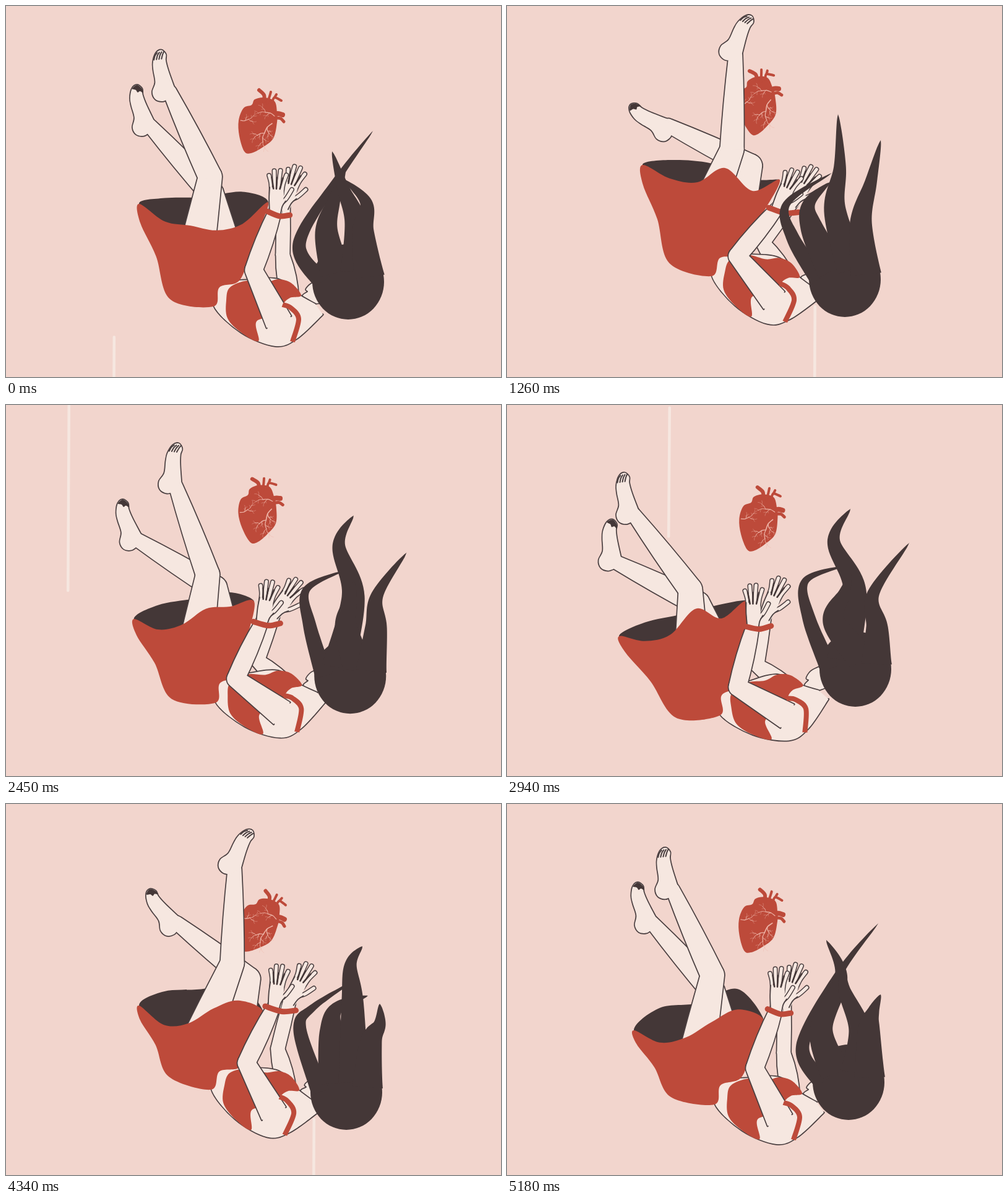
These frames come from a looping animation (800x600 px, 5250 ms). An HTML page with a canvas:

```html
<!DOCTYPE html>
<html lang="en">
<head>
<meta charset="utf-8">
<title>Falling</title>
<style>
  html, body { margin: 0; width: 100%; height: 100%; overflow: hidden; background: #f2d5cd; }
  canvas { display: block; width: 100vw; height: 100vh; }
</style>
</head>
<body>
<canvas id="stage" width="800" height="600"></canvas>
<script>
const ctx = document.getElementById('stage').getContext('2d');
const LOOP = 5250, STEP = 70;
const BG = '#f2d5cd', SKIN = '#f6e7e0', RED = '#bd4a3a', DARK = '#443737', INK = '#4a3f40', PALE = '#f5dfd7', VEIN = '#eeb5a8';

// Streaks: x, length, time of entry at the bottom edge
const streaks = [
  [174, 330, -43], [335, 250, 560], [497, 330, 1184], [262, 208, 1493], [651, 336, 1517], [335, 250, 1793],
  [101, 300, 2050], [262, 208, 2543], [497, 330, 3358], [497, 330, 4280], [101, 300, 4360], [651, 336, 4420]
];

// root (the waist) and heart: x, y, degrees; limbs: angles from the body outwards, 0 = up;
// rim: both ends of the skirt opening, with the sag of its front and back edges;
// locks: two bends and a tip for each of four locks of hair
const poses = [
  { at: 0, root: [335,486,0], heart: [392,238,0],
    leg: [10.3,-25.4,6], farLeg: [-12.6,-42.4,0], arm: [-26,20,3], farArm: [-10,1,20],
    rim: [215,320,424,318], front: [29,36,44,34], back: [-9,-10,-18], head: [553,446],
    locks: [474,385,532,285,593,202, 518,365,530,315,549,262, 565,350,545,295,527,235, 577,365,582,318,545,280] },
  { at: 1260, root: [330,437,7.7], heart: [402,208,-15],
    leg: [22.2,2.2,40], farLeg: [14,-63.8,-43], arm: [-39.9,39.7,25], farArm: [-35,36,32],
    rim: [219,257,441,282], front: [17,18,-10,22], back: [-13,-15,3], head: [546,442],
    locks: [462,375,452,320,525,270, 493,360,488,320,522,285, 530,330,538,260,535,175, 572,350,588,285,604,217] },
  { at: 1890, root: [331,457,5.7], heart: [410,207,-21],
    leg: [22.1,1.1,42], farLeg: [6,-52.4,-21], arm: [-45.4,37.4,24], farArm: [-43,32,52],
    rim: [238,312,417,318], front: [27,21,14,-14], back: [-24,-32,-37], head: [548,452],
    locks: [494,370,490,315,548,277, 560,320,550,235,570,192, 575,365,573,325,570,300, 598,360,610,310,644,258] },
  { at: 2940, root: [344,502,-12.7], heart: [395,236,-4],
    leg: [-1.1,-37,5], farLeg: [-21.7,-63.3,13], arm: [-59.9,14.2,0], farArm: [-54.4,9,24],
    rim: [181,374,388,318], front: [19,20,-11,16], back: [-11,-8,-7], head: [563,427],
    locks: [488,345,482,285,545,260, 562,300,528,220,555,168, 528,350,545,305,556,272, 598,360,592,305,650,223] },
  { at: 3710, root: [341,483,-9.5], heart: [387,247,6],
    leg: [4.9,-18.3,14], farLeg: [-5.1,-69.3,-28], arm: [-49.4,9.4,0], farArm: [-39.5,4.3,26],
    rim: [194,335,388,341], front: [32,37,24,11], back: [-21,-17,-28], head: [561,426],
    locks: [482,375,490,325,535,240, 527,340,535,290,578,267, 562,290,540,225,556,190, 592,320,584,255,608,197] },
  { at: 4340, root: [331,462,7.5], heart: [385,238,10],
    leg: [22.7,1.5,42], farLeg: [13,-52,-21], arm: [-28.5,25.8,8], farArm: [-13.7,13.9,28],
    rim: [215,326,416,337], front: [29,24,-2,-17], back: [-25,-32,-45], head: [550,466],
    locks: [475,365,495,330,560,287, 525,370,535,330,585,310, 560,320,557,260,576,230, 590,385,604,355,604,323] },
  { at: 5180, root: [335,486,0], heart: [390,240,1],
    leg: [11.1,-24.9,8], farLeg: [-12.4,-41.6,-2], arm: [-26,20,3], farArm: [-10,1,20],
    rim: [205,366,415,350], front: [23,18,-4,-21], back: [-33,-36,-54], head: [552,450],
    locks: [478,390,538,272,600,193, 508,365,540,280,516,220, 570,365,545,300,545,262, 585,365,592,335,604,308] }
];

function poseAt(t) {
  const i = poses.findLastIndex(p => p.at <= t);
  const a = poses[i], b = poses[(i + 1) % poses.length];
  const u = (t - a.at) / ((b.at || LOOP) - a.at);
  const s = u * u * (3 - 2 * u), mix = {};
  for (const key in a) if (key !== 'at') mix[key] = a[key].map((v, j) => v + (b[key][j] - v) * s);
  return mix;
}

// Geometry
const pairs = list => Array.from({ length: list.length >> 1 }, (_, i) => [list[2 * i], list[2 * i + 1]]);
const lerp = ([a, b], [c, d], s) => [a + (c - a) * s, b + (d - b) * s];
const shift = ([x, y], dx, dy) => [x + dx, y + dy];

function along([x, y], deg, len) {
  const r = deg * Math.PI / 180;
  return [x + len * Math.sin(r), y - len * Math.cos(r)];
}

// Local point of a rotated frame on the stage
function at([x, y, deg], lx, ly) {
  const r = deg * Math.PI / 180, c = Math.cos(r), s = Math.sin(r);
  return [x + lx * c - ly * s, y + lx * s + ly * c];
}

// Smooth path through the points
function curve(p, closed = false) {
  const n = p.length;
  const get = i => closed ? p[(i + n) % n] : p[Math.max(0, Math.min(n - 1, i))];
  const path = new Path2D();
  path.moveTo(...p[0]);
  for (let i = 0; i < (closed ? n : n - 1); i++) {
    const [a, b, c, d] = [get(i - 1), get(i), get(i + 1), get(i + 2)];
    path.bezierCurveTo(b[0] + (c[0] - a[0]) / 6, b[1] + (c[1] - a[1]) / 6,
      c[0] - (d[0] - b[0]) / 6, c[1] - (d[1] - b[1]) / 6, c[0], c[1]);
  }
  return path;
}
const line = (...list) => curve(pairs(list));
const loop = (...list) => curve(pairs(list), true);

// Limb pointing up: open at its base, round at its end
function limb(len, base, mid, end) {
  const path = new Path2D(), bulge = 2 * mid - (base + end) / 2;
  path.moveTo(-base, 0);
  path.quadraticCurveTo(-bulge, -len / 2, -end, -len);
  path.arc(0, -len, end, Math.PI, 2 * Math.PI);
  path.quadraticCurveTo(bulge, -len / 2, base, 0);
  return path;
}

function put(path, [x, y], deg) {
  const out = new Path2D();
  out.addPath(path, new DOMMatrix().translate(x, y).rotate(deg));
  return out;
}

// Painting
function fill(path, color) { ctx.fillStyle = color; ctx.fill(path); }
function stroke(path, color = INK, width = 1.8) {
  ctx.strokeStyle = color;
  ctx.lineWidth = width;
  ctx.stroke(path);
}
// Joined parts share one outline
function skin(...paths) {
  paths.forEach(p => stroke(p, INK, 3.4));
  paths.forEach(p => fill(p, SKIN));
}
function placed([x, y, deg], draw) {
  ctx.save();
  ctx.translate(x, y);
  ctx.rotate(deg * Math.PI / 180);
  draw();
  ctx.restore();
}

function vein(x, y, deg, len, depth) {
  const [ex, ey] = along([x, y], deg, len), [mx, my] = along([x, y], deg + 14, len / 2);
  stroke(line(x, y, mx, my, ex, ey), VEIN, 0.4 + depth * 0.4);
  if (!depth) return;
  vein(ex, ey, deg - 28, len * 0.72, depth - 1);
  vein(ex, ey, deg + 36, len * 0.6, depth - 1);
  vein(mx, my, deg - 55, len * 0.5, depth - 1);
}

function heart() {
  fill(loop(-7,-3, -15,-28, -16,-53, -8,-73, 5,-78, 10,-87, 25,-90, 42,-84, 46,-66, 46,-50, 40,-24, 22,-9, 4,0), RED);
  stroke(line(25,-84, 25,-94, 17,-102), RED, 6);
  stroke(line(30,-80, 34,-92, 36,-99), RED, 4);
  stroke(line(38,-82, 42,-90, 53,-85), RED, 4);
  stroke(line(42,-90, 45,-95), RED, 4);
  stroke(line(38,-60, 47,-64, 55,-62), RED, 8);
  stroke(line(44,-57, 52,-56, 57,-51), RED, 5);
  vein(38, -48, 218, 20, 3);
  vein(-13, -53, 82, 13, 2);
  vein(42, -60, 292, 16, 2);
}

const footShape = line(6,-9, -6,-34, -12,-50, -13,-60, -21,-66, -29,-60, -32,-45, -30,-32, -25,-13, -28,3, -22,14, -10,16, 0,10);

function toes() {
  for (let i = 0; i < 4; i++) stroke(line(-31 + 4 * i,-49 - i, -30 + 4 * i,-56 - i, -27 + 3.5 * i,-61 - i), INK, 2);
}
const darkToes = () => fill(loop(-29,-60, -21,-66, -13,-60, -11,-53, -16,-56, -20,-54, -23,-58), DARK);

function leg(hip, [thigh, calf, foot], thighLen, calfLen, detail) {
  const knee = along(hip, thigh, thighLen), ankle = along(knee, calf, calfLen);
  skin(put(limb(thighLen, 30, 25, 19), hip, thigh), put(limb(calfLen, 19, 16, 11), knee, calf), put(footShape, ankle, foot));
  placed([...ankle, foot], detail);
}

function armJoints(shoulder, [upper, fore], upperLen, foreLen) {
  const elbow = along(shoulder, upper, upperLen);
  return { shoulder, elbow, wrist: along(elbow, fore, foreLen), upperLen, foreLen };
}

function arm(j, [upper, fore, turn], base, mid) {
  skin(put(limb(j.upperLen, base, mid + 4, mid), j.shoulder, upper), put(limb(j.foreLen, mid, mid, 10), j.elbow, fore));
  placed([...j.wrist, turn], hand);
}

function hand() {
  const digits = [[-13,-57], [-5,-65], [5,-66], [15,-59]].map(([x, y]) => line(x * 0.6,-28, x * 0.7,-44, x,y));
  digits.push(line(5,-10, 16,-20, 25,-36));
  for (const d of digits) {
    stroke(d, INK, 8);
    stroke(d, SKIN, 5);
  }
  fill(loop(-10,-36, -10,-14, -9,6, 9,6, 12,-14, 10,-36), SKIN);
  stroke(line(-11,-38, -11,-20, -9,2));
  stroke(line(16,-17, 11,-8, 9,4));
  for (const x of [-6, 0, 7]) stroke(line(x * 0.8,-36, x * 1.4,-54), DARK, 2.6);
}

function torso() {
  skin(line(173,-41, 159,-37, 150,-28, 153,-24, 145,-18, 148,-10, 160,-5, 175,-6));
  skin(line(177,13, 135,52, 100,64, 45,42, 1,-1, 10,-36, 55,-43, 105,-44, 137,-20, 165,-4));
  fill(loop(27,-31, 55,-42, 84,-39, 105,-44, 126,-38, 142,-18, 124,-14, 113,-4, 105,14, 70,24, 73,56, 45,42, 23,19, 21,-10), RED);
}

// Skirt edges follow the rim and the waist
function skirtParts(p) {
  const left = p.rim.slice(0, 2), right = p.rim.slice(2);
  const sag = (list, s) => list.map((v, i) => shift(lerp(left, right, s[i]), 0, v));
  const front = sag(p.front, [0.2, 0.4, 0.6, 0.8]), back = sag(p.back, [0.2, 0.5, 0.8]);
  const waist = at(p.root, 43, -43), seat = at(p.root, -70, -12);
  const outline = [left, ...front, right, lerp(right, waist, 0.55), waist, at(p.root, 10, -31), at(p.root, 0, 0),
    seat, lerp(seat, left, 0.45), shift(lerp(seat, left, 0.8), -8, 0)];
  const lining = [left, ...back, right, ...front.reverse().map(q => shift(q, 0, 8))];
  return { outline: curve(outline, true), lining: curve(lining, true), right, waist };
}

// Tapered lock around a smooth spine
function lock(p, width) {
  const left = [], right = [], n = 24;
  const get = i => p[Math.max(0, Math.min(3, i))];
  const point = s => {
    const i = Math.min(2, Math.floor(s)), u = s - i;
    return [0, 1].map(k => {
      const [a, b, c, d] = [get(i - 1)[k], get(i)[k], get(i + 1)[k], get(i + 2)[k]];
      return b + u * (c - a + u * (2 * a - 5 * b + 4 * c - d + u * (3 * (b - c) + d - a))) / 2;
    });
  };
  for (let i = 0; i <= n; i++) {
    const s = 3 * i / n, [x, y] = point(s), [ax, ay] = point(Math.max(0, s - 0.05)), [bx, by] = point(Math.min(3, s + 0.05));
    const r = width / 2 * (1 - i / n) ** 0.85 / (Math.hypot(bx - ax, by - ay) || 1);
    left.push([x + (ay - by) * r, y + (bx - ax) * r]);
    right.unshift([x - (ay - by) * r, y - (bx - ax) * r]);
  }
  fill(curve([...left, ...right]), DARK);
}

function hair({ head, locks }) {
  const ball = new Path2D();
  ball.ellipse(...head, 58, 61, 0, 0, 2 * Math.PI);
  fill(ball, DARK);
  const roots = [[-42, 0, 30], [-20, -14, 52], [12, -16, 50], [34, -8, 50]];
  roots.forEach(([dx, dy, width], i) => lock([shift(head, dx, dy), ...pairs(locks.slice(6 * i, 6 * i + 6))], width));
}

function drawStreaks(t) {
  for (const [x, length, start] of streaks) {
    const top = 600 - ((t - start + LOOP) % LOOP) * 1.5;
    if (top + length > 0) stroke(line(x + 0.8, top, x - 0.8, top + length), SKIN, 4.5);
  }
}

function draw(t) {
  const p = poseAt(t), skirt = skirtParts(p);
  const near = armJoints(at(p.root, 106, 25), p.arm, 93, 102);
  const far = armJoints(at(p.root, 125, -11), p.farArm, 73, 81);
  ctx.fillStyle = BG;
  ctx.fillRect(0, 0, 800, 600);
  drawStreaks(t);
  placed(p.heart, heart);

  fill(skirt.lining, DARK);
  leg(at(p.root, 25, -60), p.farLeg, 126, 148, darkToes);
  leg(at(p.root, -32, -61), p.leg, 151, 152, toes);

  const gap = new Path2D();
  [skirt.right, near.wrist, near.elbow, skirt.waist].forEach(q => gap.lineTo(...q));
  fill(gap, PALE);
  arm(far, p.farArm, 13, 11);
  placed(p.root, torso);
  fill(skirt.outline, RED);
  arm(near, p.arm, 22, 14);

  const middle = lerp(near.wrist, far.wrist, 0.5);
  stroke(curve([shift(near.wrist, -14, 0), shift(middle, 0, 13), shift(far.wrist, 10, 16)]), RED, 9);
  ctx.lineCap = 'butt';
  placed(p.root, () => stroke(line(112,-3, 125,2, 138,20, 128,57), RED, 8));
  ctx.lineCap = 'round';
  hair(p);
}

ctx.lineCap = ctx.lineJoin = 'round';
const begin = performance.now();
function tick() {
  const t = (performance.now() - begin) % LOOP;
  draw(Math.floor(t / STEP) * STEP);
  requestAnimationFrame(tick);
}
tick();
</script>
</body>
</html>
```
